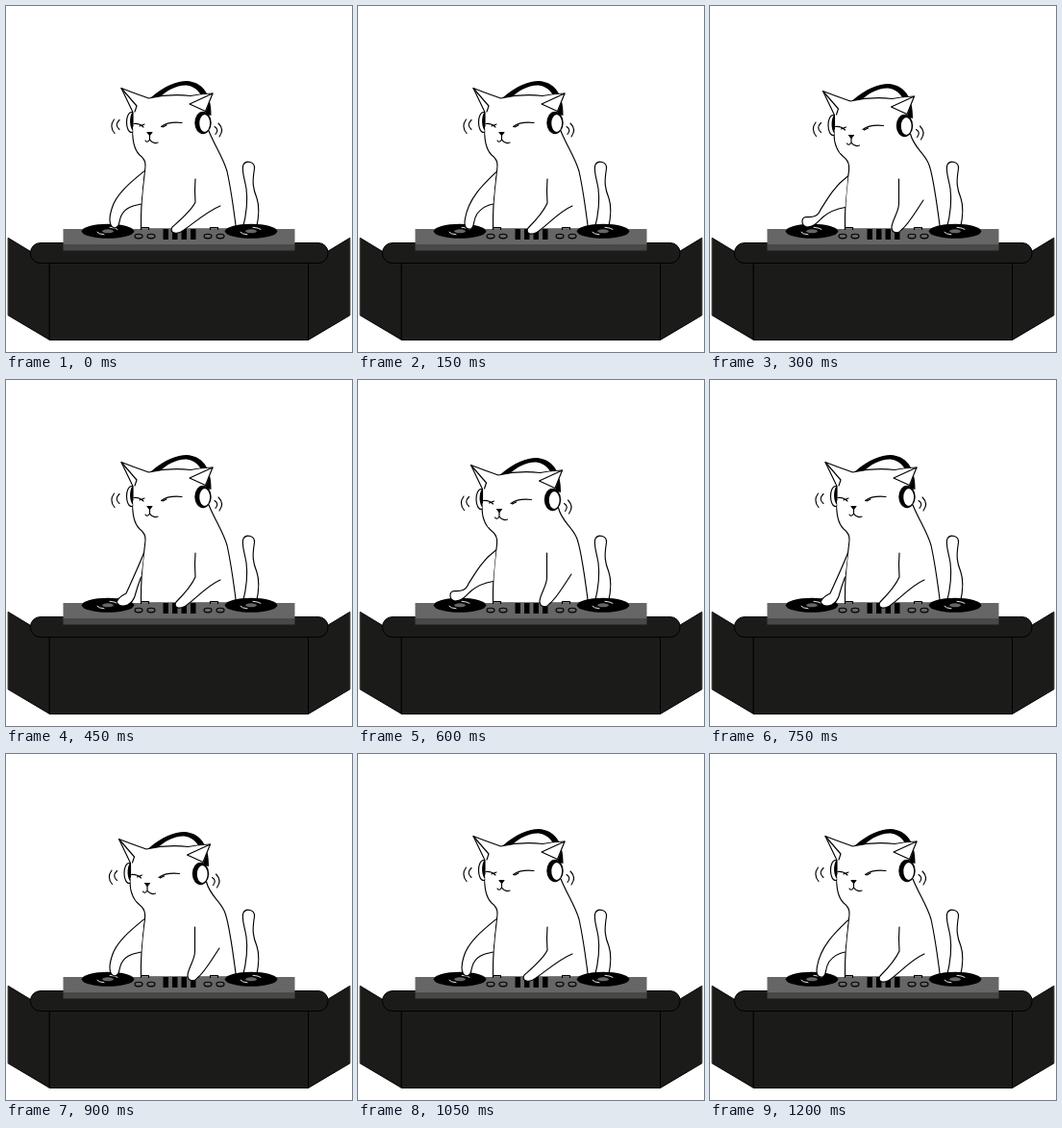
An HTML page for the animation above (1350 ms loop, 360 by 360 pixels).

```html
<!DOCTYPE html>
<html lang="en">
<head>
<meta charset="utf-8">
<title>Cat DJ</title>
<style>
html, body { margin: 0; width: 100%; height: 100%; overflow: hidden; background: #fff; }
svg { display: block; width: 100vw; height: 100vh; }
</style>
</head>
<body>
<svg viewBox="0 0 360 360" fill="none" stroke="#000" stroke-width="1.150" stroke-linecap="round" stroke-linejoin="round">
  <defs>
    <g id="disc">
      <ellipse rx="27.200" ry="7.500" fill="#000" stroke="none"/>
      <ellipse rx="6" ry="2" fill="#666" stroke="none"/>
      <path d="M-11 1Q-10 3-4 3.500M2-4Q8-3.500 10-2" stroke="#fff" stroke-width=".9"/>
    </g>
    <g id="knobs">
      <ellipse cx="-6.500" rx="4" ry="2.300"/><ellipse cx="6.500" rx="4" ry="2.300"/>
      <path d="M-4-7v-2h8v2"/>
    </g>
  </defs>

  <!-- tail -->
  <path fill="#fff" d="M246.500 231C250 217 252 205 250 190C248 178 244.500 170 247 165C250 160 259 162 258.500 169C256 184 257 190 261 200C264 209 263 220 260.500 231"/>
  <path id="body" fill="#fff"/>

  <!-- desk -->
  <g fill="#1b1b19" stroke-width="1">
    <path d="M2.500 241.500L45.500 267.500V347.500L2.500 322ZM357.500 241.500L314.500 267.500V347.500L357.500 322Z"/>
    <path d="M45.500 260H314.500V347.500H45.500Z"/>
    <rect x="25.500" y="246.500" width="309.500" height="21" rx="10"/>
  </g>
  <g stroke="none">
    <path fill="#666" d="M59.500 232H300.500V248H59.500Z"/>
    <path fill="#484848" d="M59.500 248H300.500V254.500H59.500Z"/>
    <path fill="#000" d="M163.500 232h5.500v11h-5.500zM173 232h5.500v11h-5.500zM182.500 232h5.500v11h-5.500zM192 232h5.500v11h-5.500z"/>
  </g>
  <use href="#knobs" x="144.500" y="239.500"/>
  <use href="#knobs" x="216.500" y="239.500"/>
  <use href="#disc" x="106" y="234.300"/>
  <use href="#disc" x="255" y="234.300"/>

  <path id="left" fill="#fff"/>
  <path id="right" fill="#fff"/>

  <g id="head">
    <path fill="#000" stroke="none" d="M151 95C165 83 178 78 188 78C204 79 214 91 213.500 114L207 112C208 96 200 84 188 82.500C178 82 167 88 160 95Z"/>
    <ellipse cx="130.500" cy="121" rx="5" ry="10.500" fill="#fff"/>
    <path fill="#000" stroke="none" d="M131.500 110.500C128 115 128 127 133 131L135 130V111Z"/>
    <!-- skull -->
    <path fill="#fff" stroke="none" d="M132 110L120 85.500L148.500 96Q170 91 192 93.500L215 91L208 109.500V131L205 150H138Q132 140 132 125Z"/>
    <path d="M132 125Q132 117 132 110.500L120 85.500Q134 91 148.500 96Q170 91 192 93.500Q204 91 215 91"/>
    <path d="M120 85.500L136 104L134 110M215 91L191 102L207.500 109.500Z"/>
    <ellipse cx="205" cy="121.500" rx="8.700" ry="11.800" fill="#000" stroke="none"/>
    <ellipse cx="206.700" cy="122" rx="5.400" ry="9" fill="#fff" stroke="none"/>
    <!-- face -->
    <path d="M133 122.500Q139 122 143 126M139 125L144 123M161.500 125.500Q169 120 183 121.500M163 126L167 124"/>
    <path fill="#000" d="M147 131.500H152L149.500 134.500Z"/>
    <path d="M149.500 134V139M145 140Q147 143 149.500 139Q153 144 158 142"/>
    <!-- sound -->
    <path d="M112.500 118Q107 125.500 113 132.500M118 118.500Q112.500 124 118 128.500M217 125.500Q222 128.500 218 133.500M221 122Q227.500 128.500 222 136"/>
  </g>
</svg>
<script>
const bodies = {
  up: "M132 125C131 139 133 149 139 155C148 162 144.500 168 144 176Q140 205 140.500 232H239.500C237 212 234 190 230 172C226 158 218 147 211 130",
  down: "M129.500 128C128 141 132 151 139 157C147 163 144.500 171 143.500 179Q140 205 140.500 232H239.500C236 205 232 173 227 163C222 152 212 147 208.500 133"
};
const leftArms = {
  bent: "M143.500 172C130 183 114 196 110 211C107 221 107 229 113 231C119 230 117 224 120 218C124 210 131 208 140.500 206",
  near: "M143.500 173C130 186 115 200 111.500 221C110 229 112 233 117.500 232C122 229 119 224 124 216C129 210 134 207 140.500 206",
  out: "M143.500 177C130 187 123 199 115 212C112 219 108 220 100 219.500C94.500 220 94.500 229 101 230C108 230 112 225 117 220C124 214 131 211 140.500 209.500",
  scratch: "M143.500 180C137 196 130 211 125 222Q115 227 115.500 232Q119 237 126.500 234Q132 231 134 225Q137 214 140.500 205"
};
const rightArms = {
  low: "M197 180Q196 192 197 204C193 213 182 222 173 230C170 235 175 238 182 235C192 229 208 214 223 208",
  mid: "M197 180Q196 192 197 205C193 214 185 223 177 231C174 236 179 239 186 235.500C196 229 209 214 223 208",
  side: "M196.500 180V206C196 215 190 222 189 230C189 237 196 237 199 233C206 228 214 214 222 202"
};
// One beat each: head, left arm, right arm
const beats = [
  ["up", "bent", "low"], ["up", "near", "mid"], ["down", "out", "side"],
  ["up", "scratch", "mid"], ["down", "out", "side"], ["up", "scratch", "mid"],
  ["down", "bent", "side"], ["up", "bent", "low"], ["up", "near", "mid"]
];
const beatMs = 150;
const byId = id => document.getElementById(id);
const setPath = (id, d) => byId(id).setAttribute("d", d);

function draw(now) {
  const [pose, left, right] = beats[Math.floor(now / beatMs) % beats.length];
  setPath("body", bodies[pose]);
  setPath("left", leftArms[left]);
  setPath("right", rightArms[right]);
  byId("head").setAttribute("transform", pose === "down" ? "translate(-2.500 3)" : "");
}

const start = performance.now();
function tick() {
  draw(performance.now() - start);
  requestAnimationFrame(tick);
}
tick();
</script>
</body>
</html>
```
